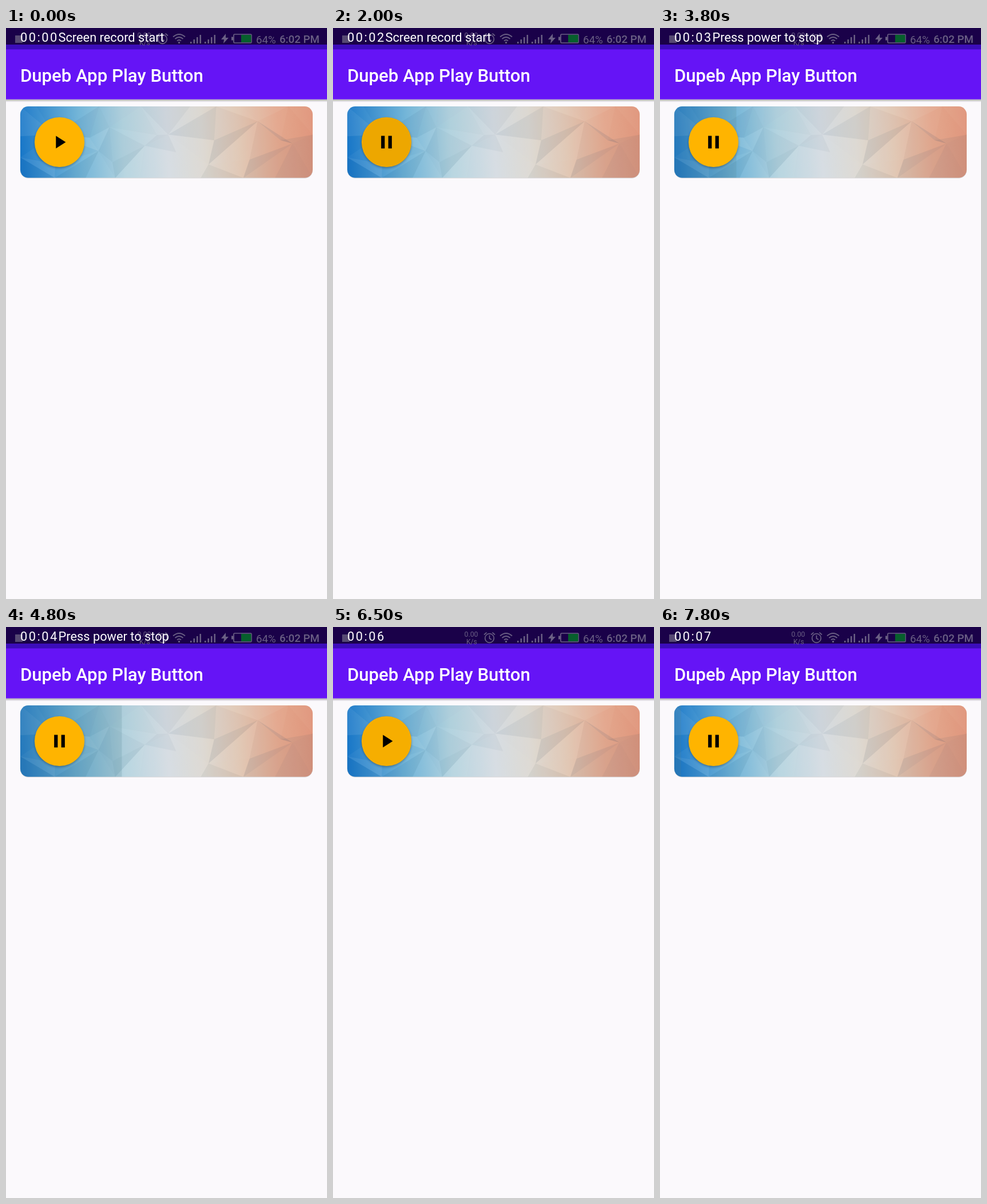
An HTML page for the animation above (8000 ms loop, 561x998 px).

```html
<!DOCTYPE html>
<html lang="en">
<head>
<meta charset="utf-8">
<title>Play button</title>
<style>
html, body { margin: 0; width: 100%; height: 100%; overflow: hidden; background: #fbf9fc; }
svg { display: block; width: 100vw; height: 100vh; }
text { font-family: Roboto, sans-serif; white-space: pre; }
.dim { fill: #6a5f84; }
.line { fill: none; stroke: #6a5f84; stroke-width: 1.7; }
.toast { fill: #fff; font-size: 21.8px; }
</style>
</head>
<body>
<svg viewBox="0 0 561 998" preserveAspectRatio="none">
  <defs>
    <clipPath id="card"><rect x="24.900" y="137.100" width="511.100" height="124.700" rx="14"/></clipPath>
    <linearGradient id="shade" x2="0" y2="1">
      <stop stop-color="#000" stop-opacity=".32"/>
      <stop offset="1" stop-color="#000" stop-opacity="0"/>
    </linearGradient>
    <linearGradient id="sky" gradientUnits="userSpaceOnUse" x1="28" y1="213" x2="536" y2="187">
      <stop stop-color="#1a78c8"/>
      <stop offset=".2" stop-color="#72b5d8"/>
      <stop offset=".35" stop-color="#b2d2de"/>
      <stop offset=".5" stop-color="#d3dae0"/>
      <stop offset=".62" stop-color="#dbd7d0"/>
      <stop offset=".75" stop-color="#dfc4b0"/>
      <stop offset=".88" stop-color="#e3a78d"/>
      <stop offset="1" stop-color="#e0967c"/>
    </linearGradient>
    <filter id="soft" x="-20%" y="-20%" width="140%" height="140%"><feGaussianBlur stdDeviation="2"/></filter>
  </defs>
  <rect width="561" height="998" fill="#fbf9fc"/>

  <rect width="561" height="38" fill="#3c0dba"/>
  <rect width="561" height="29" fill="#1a0149"/>
  <rect y="124.700" width="561" height="5" fill="url(#shade)"/>
  <rect y="37.400" width="561" height="87.300" fill="#6514f6"/>
  <text x="24.900" y="94" fill="#fff" font-size="31.160" font-weight="500">Dupeb App Play Button</text>

  <rect x="16" y="13" width="13" height="13" fill="#574a73"/>
  <g class="dim">
    <text x="229.500" y="17" font-size="12.300">0.00</text>
    <text x="233" y="30" font-size="12">K/s</text>
    <text x="437" y="26.500" font-size="18.700">64%</text>
    <text x="478" y="26" font-size="18.700" font-weight="500">6:02 PM</text>
    <path id="bars"/>
    <path d="M384 10L376 20H381L380 27L389 17H384Z"/>
    <rect x="394" y="15.500" width="3" height="6"/>
  </g>
  <g class="line">
    <circle cx="273.500" cy="19.500" r="7.800"/>
    <path d="M273.500 14.500V20L277 22M264 13.500L268.500 9.700M283 13.500L278.500 9.700"/>
    <path d="M292 15.500Q302.500 6.500 313 15.500M295.500 19Q302.500 13 309.500 19M299 22.500Q302.500 19.500 306 22.500"/>
    <circle cx="302.500" cy="25.500" r=".8"/>
    <rect x="398" y="11" width="31" height="15" rx="1.500"/>
  </g>
  <rect x="411" y="12" width="17.500" height="13" fill="#075f2d"/>
  <text id="clock" class="toast" x="25" y="23.700" letter-spacing="2.500"></text>
  <text id="note" class="toast" x="91.500" y="23.700"></text>

  <rect x="24.900" y="138.100" width="511.100" height="124.700" rx="14" opacity=".14"/>
  <g clip-path="url(#card)">
    <rect x="24" y="137" width="513" height="126" fill="url(#sky)"/>
    <g id="mesh"></g>
    <rect id="progress" x="25" y="137" height="126" fill="#55828a" opacity=".2"/>
  </g>

  <g transform="translate(93.500 199.500)">
    <circle cy="2" r="43.300" opacity=".32" filter="url(#soft)"/>
    <circle r="43.600" fill="#ffb400"/>
    <circle id="ripple" r="43.600"/>
    <path id="icon" transform="scale(1.558)"/>
  </g>
</svg>
<script>
const $ = id => document.getElementById(id);
const PLAY = 'M-4 -7V7L7 0Z';
const PAUSE = 'M-6 -7h4v14h-4zM2 -7h4v14h-4z';

let seed = 7;
const random = () => (seed = seed * 16807 % 2147483647) / 2147483647;

// Low-poly facets: a jittered grid of faintly lighter and darker triangles.
function buildMesh() {
  const cols = 9, rows = 3;
  const grid = Array.from({ length: rows + 1 }, (_, r) =>
    Array.from({ length: cols + 1 }, (_, c) => [
      25 + (c + (c % cols ? random() - .5 : 0)) * 511 / cols,
      137 + (r + (r % rows ? random() - .5 : 0)) * 125 / rows
    ]));
  const facet = (...corners) => {
    const light = random() - .5;
    return `<path d="M${corners.join('L')}Z" fill="${light > 0 ? '#fff' : '#246'}" opacity="${Math.abs(light) * .2}"/>`;
  };
  let out = '';
  for (let r = 0; r < rows; r++) {
    for (let c = 0; c < cols; c++) {
      const a = grid[r][c], b = grid[r][c + 1], d = grid[r + 1][c], e = grid[r + 1][c + 1];
      out += (r + c) % 2 ? facet(a, b, d) + facet(b, e, d) : facet(a, b, e) + facet(a, e, d);
    }
  }
  $('mesh').innerHTML = out;
}

function buildBars() {
  let d = '';
  for (const x of [322, 347])
    for (let i = 0; i < 4; i++) d += `M${x + i * 5.5} 27v${-3 - 4 * i}h2.5V27z`;
  $('bars').setAttribute('d', d);
}

const clamp = v => Math.min(1, Math.max(0, v));
const taps = [1900, 6200, 7300];   // moments of release
const SPEED = .069;                // progress, px per ms

// Darkens while pressed, fades after release.
const press = (t, up) => clamp((t - up + 300) / 200) * clamp((up + 500 - t) / 400);

function draw(t) {
  const tap = taps.filter(up => up <= t).length;
  const playing = tap % 2 === 1;
  const played = playing ? Math.max(0, t - taps[tap - 1] - 330) : 0;
  $('clock').textContent = '00:0' + Math.min(7, Math.floor((t + 100) / 1000));
  $('note').textContent = t < 2900 ? 'Screen record start' : t < 5900 ? 'Press power to stop' : '';
  $('icon').setAttribute('d', playing ? PAUSE : PLAY);
  $('ripple').setAttribute('opacity', .07 * Math.max(...taps.map(up => press(t, up))));
  $('progress').setAttribute('width', played * SPEED);
}

buildMesh();
buildBars();
const began = performance.now();
function tick() {
  draw((performance.now() - began) % 8000);
  requestAnimationFrame(tick);
}
tick();
</script>
</body>
</html>
```
